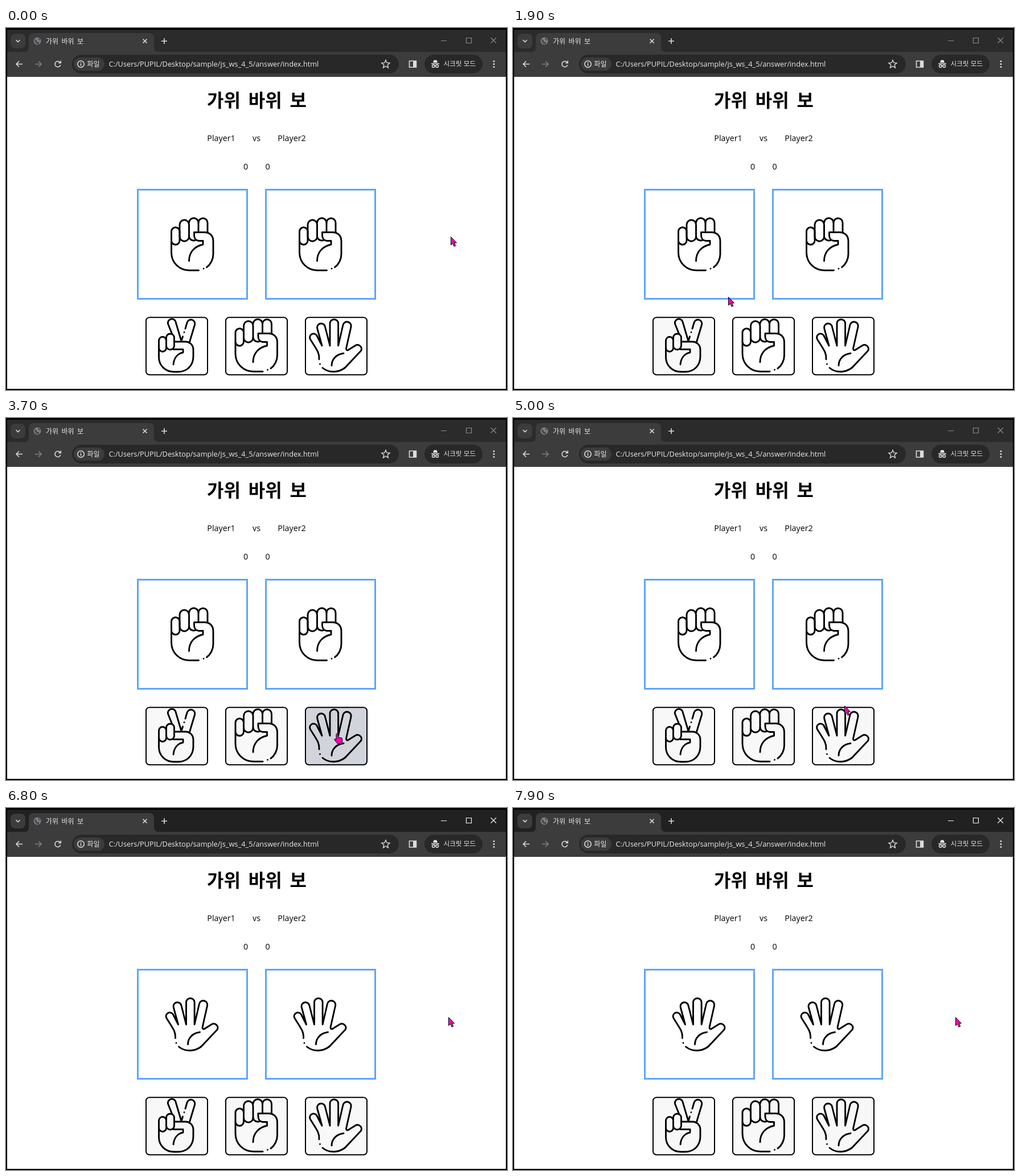
These frames come from a looping animation (880 by 637 pixels, 8000 ms). An HTML page:

```html
<!DOCTYPE html>
<html lang="ko">
<head>
<meta charset="utf-8">
<title>가위 바위 보</title>
<style>
  html, body { margin: 0; width: 100%; height: 100%; overflow: hidden; background: #000; }
  svg { display: block; width: 880px; height: 637px; }
  text { font-family: 'Open Sans', 'Noto Sans CJK KR', 'Noto Sans CJK', sans-serif; }
  .ko { font-family: 'Noto Sans CJK KR', 'Noto Sans CJK', sans-serif; fill: #e8e8e8; font-size: 12px; }
  .line { fill: none; stroke: #dcdcdc; stroke-width: 1.6; }
  .hand { fill: none; stroke: #000; stroke-width: 2.9; stroke-linecap: round; stroke-linejoin: round; }
  .page { text-anchor: middle; font-size: 14.3px; }
  .card { fill: #fff; stroke: #60a5fa; stroke-width: 3; }
  .button { stroke: #000; stroke-width: 2; }
  .cursor { fill: #f500b4; stroke: #000; stroke-width: 1; stroke-linejoin: round; }
</style>
</head>
<body>
<svg viewBox="0 0 880 637">
  <defs>
    <g id="scissors" class="hand">
      <path d="M29.5 39v13a6.5 6.5 0 0 1-13 0V39a6.5 6.5 0 0 1 13 0"/>
      <path d="M29.5 34a7 7 0 0 1 14 0V48a7 7 0 0 1-14 0Z"/>
      <path d="M39.5 27L32.5 9.5A7 7 0 0 1 45.8 5.3L56 40"/>
      <path d="M56.3 39L58.5 32M61 24.5v.1M63 18L66 7.5A7 7 0 0 1 79.6 11L70 43"/>
      <path d="M43.5 41H63C71 41 77 47 77 55V67C77 83 66 94 50 94H43C28 94 16.5 83 16.5 68V52"/>
      <path d="M42 54.5H59V60C49 62 43 70 42 81"/>
    </g>
    <g id="rock" class="hand">
      <path d="M25.5 25v16a7.2 7.2 0 0 1-14.5 0V25a7.2 7.2 0 0 1 14.5 0"/>
      <path d="M25.5 13a8.2 8.2 0 0 1 16.5 0V34a8.2 8.2 0 0 1-16.5 0Z"/>
      <path d="M42 9.7a8.2 8.2 0 0 1 16.5 0V26M42 34a8.2 8.2 0 0 0 12 6"/>
      <path d="M58.5 9.7a8 8 0 0 1 16 0V27"/>
      <path d="M42 77C42 61 52 51 66.5 48V41.5H59C54 41 51 37 51 32V26.5H69C79 26.5 84.5 33 84.5 42V65C84.5 74 80 83 73 88M67.5 90.5v.1M59 93.5H43C25 93.5 11 80 11 62V42"/>
    </g>
    <g id="paper" class="hand">
      <path d="M18 72C19 60 13 54 2.6 37A6.6 6.6 0 0 1 13.8 30L23 48L14.8 18A7 7 0 0 1 28.3 14L37 48V9a7.3 7.3 0 0 1 14.6 0V48L60 11.5A7.2 7.2 0 0 1 74 15L65.5 53Q66 58 70 55L82 47.5A7 7 0 0 1 91.5 57L68 82C58 95 37 98 24 87M19.5 80.5v.1"/>
      <path d="M40 83C40 72 48 63 61 61.5"/>
    </g>
  </defs>

  <!-- browser window -->
  <rect id="titlebar" x="2" y="3" width="876" height="40"/>
  <rect x="2" y="42" width="876" height="44" fill="#3c3c3c"/>
  <path d="M32 42Q40 42 40 34V18Q40 9 49 9H251Q260 9 260 18V34Q260 42 268 42Z" fill="#3c3c3c"/>
  <rect x="8" y="10" width="26" height="26" rx="8" fill="#3c3c3c"/>
  <path class="line" d="M17.5 21l3.5 3.500l3.500-3.500"/>
  <circle cx="55" cy="23" r="6.500" fill="#7d8287"/>
  <path d="M50 20q4 0 4 3t4 1v4q-7 2-8-8M56 18q3 0 4 4l-3-1z" fill="#45494c"/>
  <text class="ko" x="70" y="27.500" word-spacing="2">가위 바위 보</text>
  <path class="line" d="M240.500 19.500l7 7m0-7l-7 7M273 23h10m-5-5v10"/>
  <g id="controls" fill="none" stroke-width="1.200">
    <path d="M764 22.500h10M808.500 17.500h9v9h-9zM851.500 17l9.500 9.500m0-9.500l-9.500 9.500"/>
  </g>

  <path class="line" d="M29 63.500H18m5-5l-5 5l5 5"/>
  <path class="line" style="stroke:#808080" d="M51 63.500H62m-5-5l5 5l-5 5"/>
  <path class="line" d="M95 60.500a5 5 0 1 0 .8 4.500M96.200 57.500v4h-4"/>
  <rect x="116" y="47" width="574" height="33" rx="16.500" fill="#282828"/>
  <rect x="119" y="52" width="54" height="23" rx="11.500" fill="#3c3c3c"/>
  <circle class="line" cx="131.500" cy="63.500" r="5.700"/>
  <path class="line" d="M131.500 62.500v4M131.500 60v1.500"/>
  <text class="ko" x="142.500" y="67.500">파일</text>
  <text x="180.500" y="68" font-size="12.75" fill="#e8e8e8">C:/Users/PUPIL/Desktop/sample/js_ws_4_5/answer/index.html</text>
  <path class="line" style="stroke-width:1.4" d="M667 56.500l2 4.700l5 .4l-3.800 3.300l1.200 5l-4.400-2.700l-4.400 2.700l1.200-5l-3.800-3.300l5-.4z"/>
  <path class="line" d="M708.500 58h12v11h-12z"/>
  <path d="M715 58h6v11h-6z" fill="#dcdcdc"/>
  <rect x="735" y="47" width="102" height="33" rx="16.500" fill="#282828"/>
  <path d="M750 61l1.500-4.500h5L758 61zM747 62h14v1.400h-14z" fill="#e8e8e8"/>
  <path class="line" d="M748.500 67a2.300 2.300 0 1 0 4.600 0a2.300 2.300 0 1 0-4.600 0M755 67a2.300 2.300 0 1 0 4.600 0a2.300 2.300 0 1 0-4.600 0M753 66.500h2"/>
  <text class="ko" x="768.500" y="67" style="font-size:11.600px">시크릿 모드</text>
  <g fill="#dcdcdc"><circle cx="857" cy="58.500" r="1.500"/><circle cx="857" cy="63.500" r="1.500"/><circle cx="857" cy="68.500" r="1.500"/></g>

  <!-- game -->
  <rect x="2" y="86" width="876" height="549" fill="#fff"/>
  <text class="ko" x="440.500" y="138.500" text-anchor="middle" word-spacing="5" style="font-size:32px;font-weight:700;fill:#000">가위 바위 보</text>
  <g class="page">
    <text x="378" y="199">Player1</text>
    <text x="440" y="199">vs</text>
    <text x="502" y="199">Player2</text>
    <text x="421" y="249">0</text>
    <text x="459.500" y="249">0</text>
  </g>
  <rect class="card" x="231.500" y="284.500" width="192" height="192"/>
  <rect class="card" x="456.500" y="284.500" width="192" height="192"/>
  <use id="player1" x="279.500" y="333"/>
  <use id="player2" x="504.500" y="333"/>
  <g id="buttons"></g>

  <g id="cursor" class="cursor">
    <path id="arrow" d="M.5 .5V15L3.700 12L6 17.300L8.700 16.200L6.400 11H10.500Z"/>
    <path id="pointer" d="M0 9V1.800a1.600 1.600 0 0 1 3.200 0V6.500L9 7.800Q10.700 8.300 10.700 10V13Q10.700 16 9 18.300H2.500Q0 15.500-3.200 11Q-3.200 8.500 0 10.500Z"/>
  </g>
</svg>

<script>
const LOOP = 8000, STEP = 100, CLICK = 5500;
const hands = ['scissors', 'rock', 'paper'];
const $ = id => document.getElementById(id);

// cursor tip: [time, x, y]
const track = [
  [0, 781, 367], [100, 695, 500], [400, 695, 500], [800, 450, 428], [1000, 335, 535], [1100, 311, 570],
  [1600, 311, 570], [1900, 378, 473], [2100, 378, 473], [2300, 435, 555], [2800, 435, 555],
  [2900, 608, 379], [3100, 769, 255], [3200, 769, 255], [3700, 580, 555], [4400, 580, 555],
  [4700, 584, 483], [4900, 584, 483], [5000, 582, 506], [5200, 580, 548], [5600, 580, 548],
  [5800, 640, 541], [5900, 711, 507], [6000, 766, 477], [6200, 756, 487], [6300, 775, 398], [6400, 777, 368]
];

const buttons = hands.map((hand, i) => {
  const x = 246 + 140 * i;
  $('buttons').insertAdjacentHTML('beforeend',
    `<rect class="button" x="${x}" y="509.300" width="108" height="101" rx="6"/><use href="#${hand}" x="${x + 6}" y="511"/>`);
  return { x, rect: $('buttons').children[2 * i] };
});

function cursorAt(time) {
  const next = track.findIndex(key => key[0] > time);
  if (next < 0) return track[track.length - 1].slice(1);
  const [t0, x0, y0] = track[next - 1], [t1, x1, y1] = track[next];
  const f = (time - t0) / (t1 - t0);
  return [x0 + (x1 - x0) * f, y0 + (y1 - y0) * f].map(Math.round);
}

function buttonAt([x, y]) {
  return buttons.findIndex(b => x >= b.x && x <= b.x + 108 && y >= 509 && y <= 610);
}

// first moment each button is entered; it keeps a slight tint afterwards
const entered = buttons.map((_, i) => {
  let t = 0;
  while (buttonAt(cursorAt(t)) !== i) t += STEP;
  return t;
});

function opponentHand(time) {
  if (time <= CLICK) return 'rock';
  const ticks = Math.floor((time - 6000) / STEP * 1.1 + 0.3);
  return hands[(ticks + 2 + 30) % 3];
}

function draw(time) {
  const tip = cursorAt(time), hovered = buttonAt(tip), active = time >= CLICK;
  $('cursor').setAttribute('transform', `translate(${tip})`);
  $('arrow').style.display = hovered < 0 ? '' : 'none';
  $('pointer').style.display = hovered < 0 ? 'none' : '';
  buttons.forEach((b, i) =>
    b.rect.setAttribute('fill', i === hovered ? '#d1d5db' : time > entered[i] ? '#f8f8f8' : '#fff'));
  $('titlebar').setAttribute('fill', active ? '#202120' : '#2b2b2b');
  $('controls').setAttribute('stroke', active ? '#f2f2f2' : '#8a8a8a');
  $('player1').setAttribute('href', active ? '#paper' : '#rock');
  $('player2').setAttribute('href', '#' + opponentHand(time));
}

let start;
function tick(now) {
  start ??= now;
  draw(Math.floor((now - start) % LOOP / STEP) * STEP);
  requestAnimationFrame(tick);
}
draw(0);
requestAnimationFrame(tick);
</script>
</body>
</html>
```
